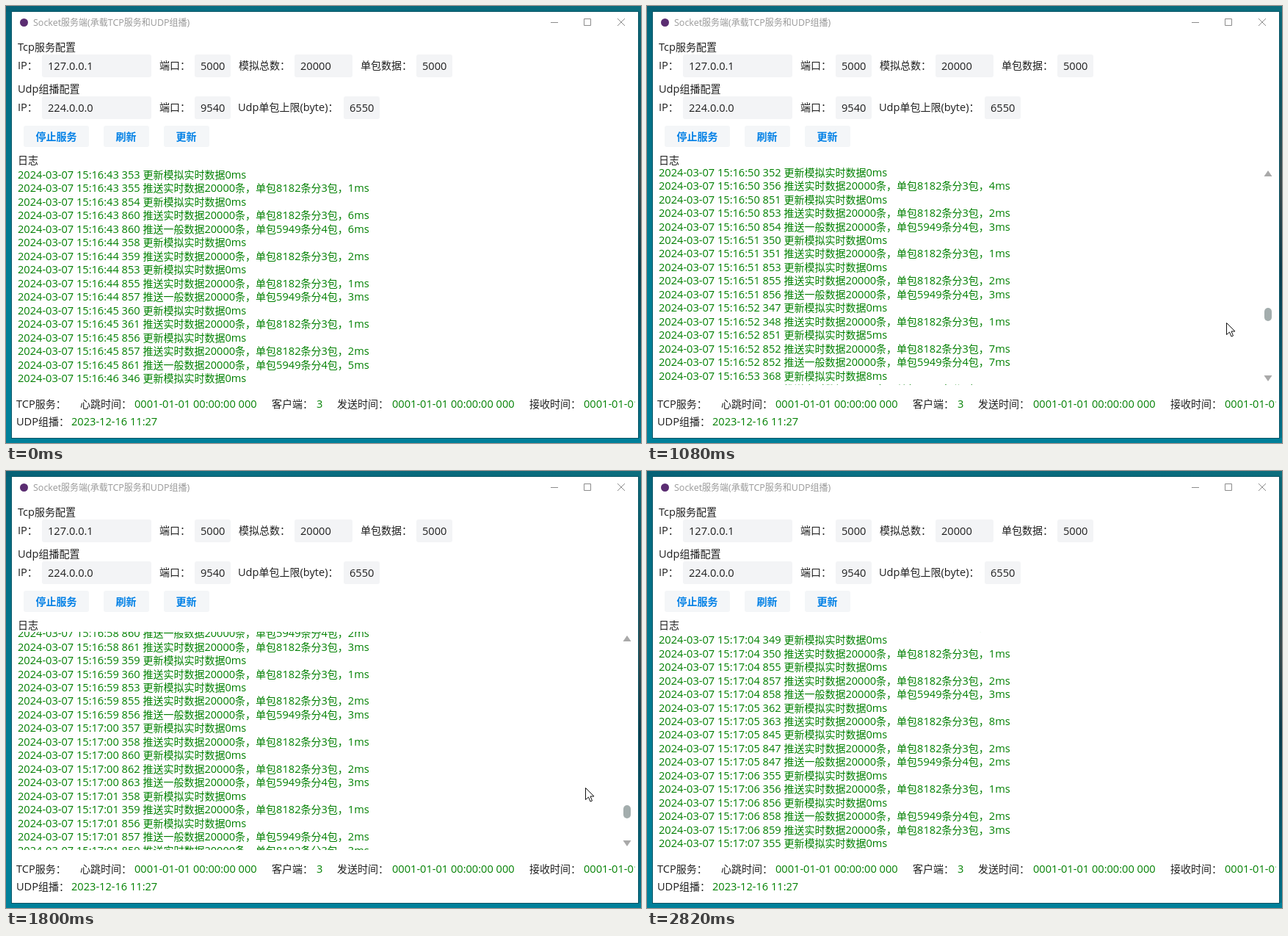
Animation of 865x595 px, one loop 3.71 s. Source, as an HTML page with a canvas:

```html
<!DOCTYPE html>
<html lang="zh-CN">
<head>
<meta charset="utf-8">
<style>
html, body { margin: 0; width: 100%; height: 100%; overflow: hidden; }
canvas { display: block; }
</style>
</head>
<body>
<canvas id="stage" width="865" height="595"></canvas>
<script>
const ctx = document.getElementById('stage').getContext('2d');
const LOOP = 3710, LINE = 18.477;
const GREEN = '#008000', INK = '#1e1e1e', BLUE = '#0080e6', FIELD = '#f3f4f6';

// One row per second: five entry times, "=n" overrides the usual cost,
// "~" means the general push comes before the real-time push.
const USUAL_ROW = '350 351 853 855 856';
const USUAL_COST = [0, 1, 0, 2, 3];
const rows = [
  '353 355 854 860=6 860=6', '358 359=2 853 855=1 857', '360 361 856 857 861=5',
  '346 347 853 857=3 858=4', '~345 346 855 861=5 861=5', '347 349 858 860 861=2',
  '349 351 857=11 858=13 859=13', '352 356=4 851 853 854', '',
  '347 348 851=5 852=7 852=7', '~368=8 369=9 856 858 859', '~360 362 849 852 853',
  '', '346 348 855 857 858=2', '360 361 847 849 850',
  '~349 350 858 860 861', '359 360 853 855 856', '357 358 860 862 863',
  '~358 359 856 857 859', '~346 348=2 860 862 863', '351 352 845 847 848',
  '349 350 855 857 858', '362 363=8 845 847 847=2', '~355 356 856 858 859', '355'
];

const REAL = '推送实时数据20000条，单包8182条分3包，';
const GENERAL = '推送一般数据20000条，单包5949条分4包，';
const two = n => String(n).padStart(2, '0');

const log = rows.flatMap((row, r) => {
  const sec = 43 + r;
  const clock = `15:${16 + Math.floor(sec / 60)}:${two(sec % 60)}`;
  const general = row[0] === '~' ? 3 : 4;
  return (row || USUAL_ROW).replace('~', '').split(' ').map((entry, k) => {
    const [ms, cost = USUAL_COST[k]] = entry.split('=');
    const what = k % 2 === 0 && k < 4 ? '更新模拟实时数据' : k === general ? GENERAL : REAL;
    return `2024-03-07 ${clock} ${ms} ${what}${cost}ms`;
  });
});

// [time, value...] steps; each holds until the next
const scrollSteps = [
  [0, 0], [380, 50], [480, 150], [680, 300], [780, 400], [980, 550], [1080, 650],
  [1280, 800], [1380, 950], [1600, 1200], [1700, 1300], [1800, 1450], [1900, 1550],
  [2000, 1650], [2200, 1750], [2300, 1850], [2400, 1939.85]
];
const pointerSteps = [
  [0], [100, 803, 511], [200, 797, 450], [280, 789, 431],
  [2500, 797, 446], [2600, 818, 510], [2700, 851, 583], [2820]
];
const BAR_FROM = 280, BAR_TO = 2600;

const stepAt = (steps, t) => steps.findLast(s => s[0] <= t);

// Latin runs are slightly larger than the CJK runs beside them.
function text(str, x, mid, color = INK, size = 14, weight = 400) {
  ctx.fillStyle = color;
  for (const run of str.match(/[\x20-\x7e]+|[^\x20-\x7e]+/g)) {
    const latin = run.charCodeAt(0) < 127;
    ctx.font = latin
      ? `${weight} ${size * 1.043}px "Open Sans", "Noto Sans", sans-serif`
      : `${weight} ${size}px "Noto Sans CJK SC", "Noto Sans CJK", sans-serif`;
    ctx.fillText(run, x, mid + 5);
    x += ctx.measureText(run).width;
  }
}

function box(x, y, w, h, color, r = 0) {
  ctx.fillStyle = color;
  ctx.beginPath();
  ctx.roundRect(x, y, w, h, r);
  ctx.fill();
}

function poly(points, fill, stroke) {
  ctx.beginPath();
  points.forEach(([x, y]) => ctx.lineTo(x, y));
  ctx.closePath();
  if (fill) { ctx.fillStyle = fill; ctx.fill(); }
  if (stroke) { ctx.strokeStyle = stroke; ctx.lineWidth = 1; ctx.stroke(); }
}

function blend(x0, y0, x1, y1, colors) {
  const g = ctx.createLinearGradient(x0, y0, x1, y1);
  colors.forEach((c, i) => g.addColorStop(i / (colors.length - 1), c));
  return g;
}

function field(x, y, w, value) {
  box(x, y, w, 31, FIELD, 3);
  text(value, x + 8, y + 16);
}

function button(x, w, label) {
  box(x, 163, w, 29, '#f4f6f8', 3);
  text(label, x + 16.5, 178, BLUE, 14, 700);
}

function desktop() {
  box(0, 0, 865, 595, blend(0, 0, 0, 595, ['#04657a', '#04748a', '#007f96', '#00809a']));
  box(0, 0, 865, 8, blend(0, 0, 865, 0, ['#066176', '#0a7084', '#08697c', '#0c6e7e']));
  box(861, 8, 4, 580, blend(0, 8, 0, 588, ['#0b6878', '#0c5563', '#3c4a4c', '#0b3c4c', '#06566a', '#00728a']));
  box(7, 7, 855, 582, '#075465');
  box(8, 8, 853, 580, '#fff');
}

function titleBar() {
  ctx.fillStyle = '#5b2d72';
  ctx.beginPath();
  ctx.arc(24.5, 22.5, 5.5, 0, 7);
  ctx.fill();
  text('Socket服务端(承载TCP服务和UDP组播)', 37, 22, '#999', 12);
  ctx.strokeStyle = '#8c8c8c';
  ctx.lineWidth = 1;
  ctx.beginPath();
  ctx.moveTo(742, 22.5); ctx.lineTo(752, 22.5);
  ctx.rect(787.5, 17.5, 9, 9);
  ctx.moveTo(833, 17); ctx.lineTo(843, 27);
  ctx.moveTo(843, 17); ctx.lineTo(833, 27);
  ctx.stroke();
}

function settings() {
  text('Tcp服务配置', 16, 56);
  text('IP：', 16, 81);
  field(49, 66, 149, '127.0.0.1');
  text('端口：', 209, 81);
  field(257, 66, 49, '5000');
  text('模拟总数：', 317, 81);
  field(393, 66, 79, '20000');
  text('单包数据：', 483, 81);
  field(559, 66, 49, '5000');

  text('Udp组播配置', 16, 113);
  text('IP：', 16, 138);
  field(49, 123, 149, '224.0.0.0');
  text('端口：', 209, 138);
  field(257, 123, 49, '9540');
  text('Udp单包上限(byte)：', 316, 138);
  field(460, 123, 49, '6550');

  button(24, 89, '停止服务');
  button(133, 62, '刷新');
  button(215, 62, '更新');
  text('日志', 16, 210);
}

function status() {
  const never = '0001-01-01 00:00:00 000';
  ctx.save();
  ctx.beginPath();
  ctx.rect(8, 525, 849, 60);
  ctx.clip();
  text('TCP服务：', 14, 542);
  text('心跳时间：', 101, 542);
  text(never, 175, 542, GREEN);
  text('客户端：', 362, 542);
  text('3', 423, 542, GREEN);
  text('发送时间：', 451, 542);
  text(never, 526, 542, GREEN);
  text('接收时间：', 713, 542);
  text(never, 787, 542, GREEN);
  text('UDP组播：', 14, 566);
  text('2023-12-16 11:27', 89, 566, GREEN);
  ctx.restore();
}

function logView(scroll) {
  ctx.save();
  ctx.beginPath();
  ctx.rect(16, 219, 835, 297);
  ctx.clip();
  log.forEach((line, i) => {
    const y = Math.round(229.9 + i * LINE - scroll);
    if (y > 205 && y < 530) text(line, 16, y, GREEN);
  });
  ctx.restore();
}

function scrollBar(scroll) {
  const grey = '#a9a9a9';
  poly([[846, 224], [851.5, 232], [840.5, 232]], grey);
  poly([[840.5, 503], [851.5, 503], [846, 511]], grey);
  const mid = 393 + (scroll - 150) * 0.0547;
  box(841, Math.round(mid - 9), 10, 18, '#a3adad', 5);
}

function pointer(x, y) {
  const shape = [[0, 0], [0, 16], [4, 12.5], [6.5, 18.5], [9, 17.5], [6.5, 11.5], [11.5, 11.5]];
  poly(shape.map(([dx, dy]) => [x + dx + 0.5, y + dy + 0.5]), '#fff', '#111');
}

function draw(t) {
  const scroll = stepAt(scrollSteps, t)[1];
  const [, px, py] = stepAt(pointerSteps, t);
  desktop();
  titleBar();
  settings();
  logView(scroll);
  status();
  if (t >= BAR_FROM && t < BAR_TO) scrollBar(scroll);
  if (px !== undefined) pointer(px, py);
}

const start = performance.now();
function tick() {
  draw((performance.now() - start) % LOOP);
  requestAnimationFrame(tick);
}
tick();
</script>
</body>
</html>
```
